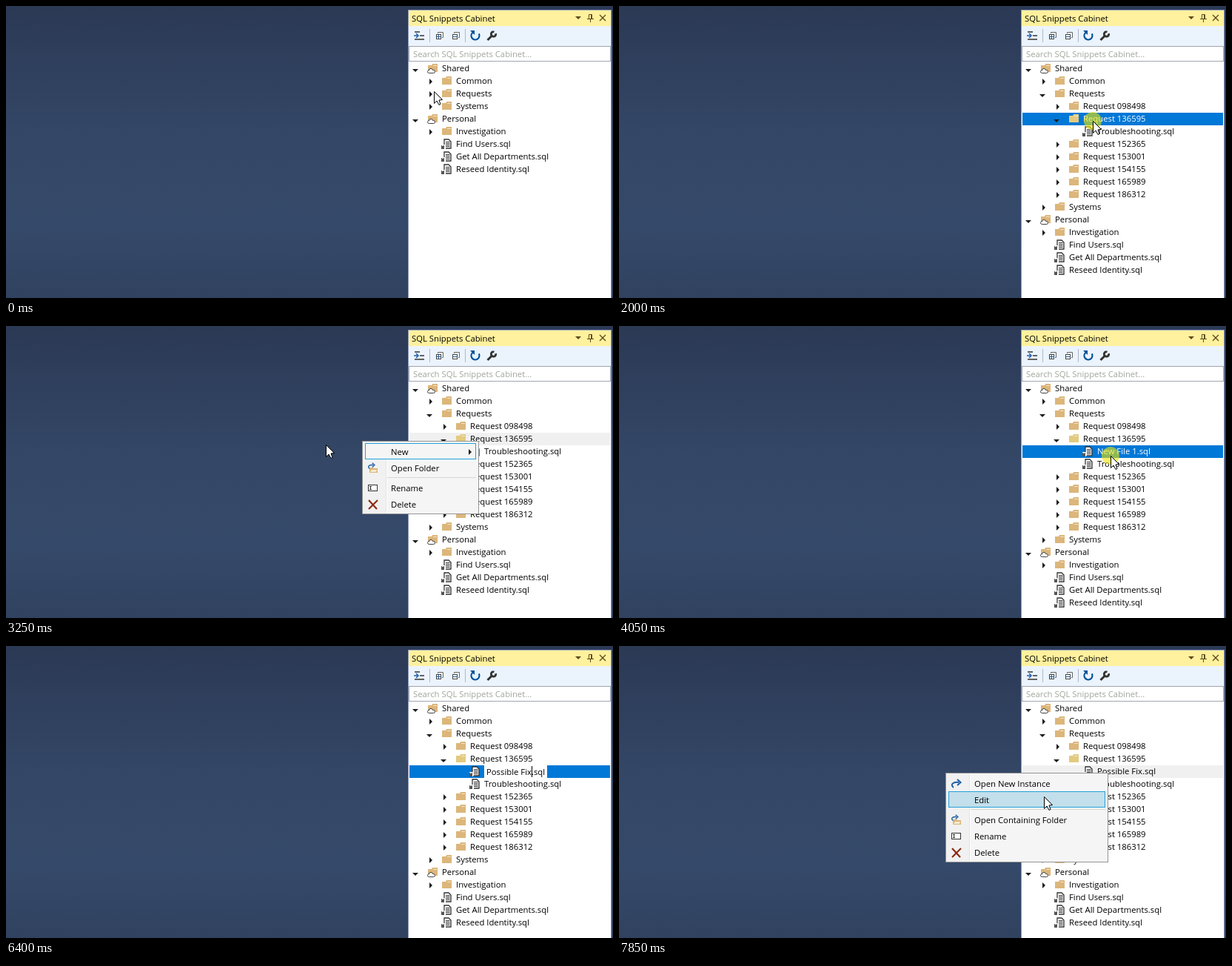
Animation, 820 px wide and 394 px high, one loop 8 s. Source, as an HTML page with a canvas:

```html
<!DOCTYPE html>
<html lang="en">
<head>
<meta charset="utf-8">
<title>Script tree</title>
<style>
html, body { margin: 0; width: 100%; height: 100%; overflow: hidden; background: #30415f; }
canvas { display: block; width: 820px; height: 394px; }
</style>
</head>
<body>
<canvas id="stage" width="820" height="394"></canvas>
<script>
const g = document.getElementById('stage').getContext('2d', { alpha: false });
const LOOP = 8000, STEP = 50;
const NAME = 'SQL Snippets Cabinet';
const FONT = '11.3px "Open Sans", "Noto Sans", sans-serif';
const BLUE = '#0078d7', INK = '#1e1e1e', TAN = '#dcb67a';

// Drawing helpers
function box(x, y, w, h, fill) { g.fillStyle = fill; g.fillRect(x, y, w, h); }
function frame(x, y, w, h, color) {
  g.strokeStyle = color; g.lineWidth = 1;
  g.strokeRect(x + .5, y + .5, w - 1, h - 1);
}
function text(s, x, mid, color = '#000') {
  g.fillStyle = color; g.fillText(s, x, mid + 4);
}
function trace(pts, close) {
  g.beginPath();
  for (let i = 0; i < pts.length; i += 2) g.lineTo(pts[i], pts[i + 1]);
  if (close) g.closePath();
}
function poly(color, ...pts) { trace(pts, true); g.fillStyle = color; g.fill(); }
function line(color, width, ...pts) {
  trace(pts); g.strokeStyle = color; g.lineWidth = width; g.stroke();
}
function at(x, y, draw) { g.save(); g.translate(x, y); draw(); g.restore(); }
const within = (t, a, b) => t >= a && t < b;

// Tree icons, centred on the origin
function folder(color = TAN) {
  poly(color, -6, -4, -1, -4, 0, -6, 7, -6, 7, 5, -6, 5);
  line('rgba(255,255,255,.6)', 1, 1, -3.5, 6, -3.5);
}
function cloudFolder() {
  folder();
  g.beginPath();
  g.arc(-4.5, 4.5, 2, Math.PI / 2, Math.PI * 1.4);
  g.arc(-2, 3, 2.6, Math.PI, Math.PI * 1.95);
  g.arc(1.5, 4.5, 2, -Math.PI / 2, Math.PI / 2);
  g.closePath();
  g.fillStyle = '#fff'; g.strokeStyle = '#424242'; g.lineWidth = 1;
  g.fill(); g.stroke();
}
function script() {
  poly('#fff', -3, -6, 3, -6, 6, -3, 6, 6, -3, 6);
  line('#333', 1.3, -3, 2, -3, -6, 3, -6, 6, -3, 6, 6, -1, 6);
  for (let y = -3; y < 5; y += 2) line('#333', 1, -1, y + .5, 4.5, y + .5);
  box(-7, 1, 5, 6, '#fff');
  box(-7, 2, 4, 5, '#555');
  box(-6, 2, 2, 1, '#ddd');
}
function expander(x, y, open) {
  if (open) poly(INK, x - 4, y + 1, x + 4, y + 1, x, y + 5);
  else poly(INK, x, y - 3, x + 4, y + 1, x, y + 5);
}

// Menu icons
function bentArrow() {
  g.beginPath();
  g.moveTo(-4, 5);
  g.bezierCurveTo(-9, 1, -5, -3, 3, -2);
  g.strokeStyle = '#1c5fa8'; g.lineWidth = 2; g.stroke();
  line('#1c5fa8', 2, 1, -6, 5.5, -2, 1, 2);
}
function openFolder() {
  poly(TAN, -5, -1, 0, -1, 1, 0, 6, 0, 6, 6, -5, 6);
  poly('#f7ead0', -2, 2, 5, 2, 4, 5, -4, 5);
  at(-2, -3, () => { g.scale(.7, .7); bentArrow(); });
}
function renameIcon() {
  box(-7, -5, 13, 9, '#fff');
  frame(-7, -5, 13, 9, '#333');
  line('#333', 1, -5, -2.5, -2, -2.5);
  line('#333', 1, -3.5, -3, -3.5, 2);
  line('#333', 1, -5, 1.5, -2, 1.5);
}
function deleteIcon() {
  line('#8b2a12', 2.2, -6, -6, 5, 6);
  line('#8b2a12', 2.2, 6, -6, -6, 6);
}

// Panel chrome
function backdrop() {
  const sky = g.createLinearGradient(0, 0, 0, 394);
  [[0, '#2b3955'], [.45, '#344766'], [.75, '#35496a'], [1, '#30425f']]
    .forEach(([p, c]) => sky.addColorStop(p, c));
  box(0, 0, 820, 394, sky);
}
function plusBox(x, plus) {
  at(x, 40, () => {
    line('#666', 1, -2.5, -3, -2.5, -4.5, 4.5, -4.5, 4.5, 2.5, 3, 2.5);
    box(-5, -2, 7, 7, '#fff');
    frame(-5, -2, 7, 7, '#444');
    line('#1c5fa8', 1, -4, 1.5, 1, 1.5);
    if (plus) line('#1c5fa8', 1, -1.5, -1, -1.5, 4);
  });
}
function panel() {
  box(543, 5, 275, 389, '#8e9bbc');
  box(544, 6, 273, 21, '#fff19d');
  box(544, 27, 273, 27, '#ebf3fc');
  box(544, 54, 273, 340, '#fff');
  text(NAME, 548, 17);
  const brown = '#5c4a1c';
  poly(brown, 769, 14, 777, 14, 773, 18);
  line(brown, 1, 787.5, 17, 787.5, 11.5, 791.5, 11.5, 791.5, 17);
  line(brown, 1.5, 790.8, 12, 790.8, 17);
  line(brown, 1, 785, 17.5, 794, 17.5);
  line(brown, 1, 789.5, 18, 789.5, 22);
  line(brown, 1.3, 802, 12, 810, 20);
  line(brown, 1.3, 810, 12, 802, 20);

  line('#1c5fa8', 1.5, 551, 40, 557, 40);
  line('#1c5fa8', 1.5, 554, 37, 557, 40, 554, 43);
  line('#333', 1.5, 552, 35, 559, 35);
  line('#333', 1.5, 559, 40, 565, 40);
  line('#333', 1.5, 552, 45, 565, 45);
  box(572, 31, 1, 18, '#b0b8c8');
  box(620, 31, 1, 18, '#b0b8c8');
  plusBox(586, true);
  plusBox(608, false);
  g.beginPath();
  g.arc(634, 40, 5.5, -.5, Math.PI * 1.3);
  g.strokeStyle = '#00539c'; g.lineWidth = 2.2; g.stroke();
  poly('#00539c', 627, 33, 633, 33, 633, 39);
  line('#333', 3, 650.5, 46, 657, 39.5);
  g.beginPath();
  g.arc(658.5, 38, 3.2, -.3, Math.PI * 1.6);
  g.lineWidth = 2.8; g.stroke();

  frame(544, 54, 273, 21, '#a0a6b0');
  text('Search ' + NAME + '...', 550, 65, '#a0a79b');
}

// Timeline: each move is start, end, target x, y and optional control point
const MOVES = [
  [450, 1000, 597, 155, 638, 132],
  [1150, 1250, 594, 153],
  [1800, 1950, 640, 155],
  [2250, 2550, 573, 170],
  [2800, 3200, 432, 160],
  [3600, 3900, 664, 175, 560, 212],
  [7050, 7150, 661, 172],
  [7450, 7850, 574, 203]
];
const CLICKS = [[50, 150], [1500, 1550], [2000, 2100], [3200, 3250], [4050, 4150], [7200, 7300]];
const KEYS = [5400, 5550, 5600, 5700, 5750, 5800, 5900, 5950, 6050, 6200, 6300, 6400];
const TYPED = 'Possible Fix';

function pointer(t) {
  let x = 578, y = 115;
  for (const [a, b, tx, ty, cx = (x + tx) / 2, cy = (y + ty) / 2] of MOVES) {
    if (t < a) break;
    const p = Math.min(1, (t - a + STEP) / (b - a + STEP));
    const u = p * p * (3 - 2 * p), v = 1 - u;
    x = v * v * x + 2 * u * v * cx + u * u * tx;
    y = v * v * y + 2 * u * v * cy + u * u * ty;
  }
  return { x: Math.round(x), y: Math.round(y) };
}
function fileStem(t) {
  const n = KEYS.filter(k => t >= k).length;
  return n ? TYPED.slice(0, n) : 'New File 1';
}

// Tree rows: level, label, icon, open state, marker
function treeRows(t) {
  const rows = [[0, 'Shared', cloudFolder, true], [1, 'Common', folder, false]];
  const unfolded = t >= 100;
  rows.push([1, 'Requests', folder, unfolded]);
  if (unfolded) {
    for (const id of ['098498', '136595', '152365', '153001', '154155', '165989', '186312']) {
      const main = id === '136595', open = main && t >= 1550;
      rows.push([2, 'Request ' + id, folder, open, main ? 'request' : '']);
      if (!open) continue;
      if (t >= 3350) rows.push([3, fileStem(t) + '.sql', script, null, 'file']);
      rows.push([3, 'Troubleshooting.sql', script, null]);
    }
  }
  rows.push([1, 'Systems', folder, false], [0, 'Personal', cloudFolder, true],
    [1, 'Investigation', folder, false]);
  for (const s of ['Find Users', 'Get All Departments', 'Reseed Identity'])
    rows.push([1, s + '.sql', script, null]);
  return rows;
}
function rowFill(mark, t) {
  if (mark === 'request') {
    if (within(t, 2000, 2100)) return BLUE;
    if (within(t, 2100, 3350)) return '#f0f0f0';
  }
  if (mark === 'file') {
    if (within(t, 4050, 6750) || within(t, 7200, 7300)) return BLUE;
    if (t >= 7300) return '#f0f0f0';
  }
}
function tree(t) {
  treeRows(t).forEach(([level, label, icon, open, mark], i) => {
    const mid = 84 + 17 * i, x = 589 + 19 * level;
    const fill = rowFill(mark, t);
    if (fill) box(545, mid - 8, 271, 17, fill);
    if (open !== null) expander(x - 36, mid, open);
    at(x - 13, mid, () => mark === 'request' && t >= 2000 ? folder('#e3ca80') : icon());
    if (mark === 'file' && within(t, 4300, 6750)) editor(label, x, mid, t);
    else text(label, x, mid, fill === BLUE ? '#fff' : '#000');
  });
}
function editor(label, x, mid, t) {
  const stem = g.measureText(fileStem(t)).width;
  const w = Math.round(g.measureText(label).width) + 6;
  const chosen = within(t, 5150, 5400);
  box(x, mid - 8, w, 17, '#fff');
  if (chosen) box(x + 3, mid - 7, stem, 15, '#99c9ef');
  text(label, x + 3, mid + 1);
  if (!chosen && !within(t, 4650, 5000))
    box(Math.round(x + 3 + (t < 5400 ? 0 : stem)), mid - 7, 1, 15, '#000');
}

// Menus: null marks a separator
const REQUEST_MENU = [['New'], ['Open Folder', openFolder], null, ['Rename', renameIcon], ['Delete', deleteIcon]];
const NEW_MENU = [['File'], ['Folder']];
const FILE_MENU = [['Open New Instance', bentArrow], ['Edit'], null,
  ['Open Containing Folder', openFolder], ['Rename', renameIcon], ['Delete', deleteIcon]];

function menu(items, x, y, w, h, cur, opened) {
  box(x, y, w, h, '#f5f5f5');
  box(x + 1, y + 1, 31, h - 2, '#f1f1f1');
  box(x + 32, y + 3, 1, h - 6, '#e2e3e3');
  box(x + 33, y + 3, 1, h - 6, '#fff');
  frame(x, y, w, h, '#959595');
  let top = y + 3;
  for (const item of items) {
    if (!item) {
      box(x + 34, top + 2, w - 38, 1, '#d7d7d7');
      top += 5;
      continue;
    }
    const [label, icon] = item, mid = top + 12;
    const hot = cur.x > x + 3 && cur.x < x + w - 4 && cur.y >= top && cur.y < top + 22;
    const lit = opened && label === 'New';
    if (hot || lit) {
      box(x + 4, top, w - 8, 22, hot ? '#c2dfeb' : '#f5f5f5');
      frame(x + 4, top, w - 8, 22, '#26a0da');
    }
    if (icon) at(x + 15, mid, icon);
    text(label, x + 39, mid);
    if (label === 'New') poly(INK, x + w - 14, mid - 4, x + w - 10, mid, x + w - 14, mid + 4);
    top += 22;
  }
}
function menus(t, cur) {
  if (within(t, 2100, 3300)) menu(REQUEST_MENU, 481, 155, 158, 99, cur, t >= 2550);
  if (within(t, 2550, 3250)) menu(NEW_MENU, 359, 155, 123, 50, cur);
  if (t >= 7300) menu(FILE_MENU, 441, 171, 220, 121, cur);
}

function cursor(t, { x, y }) {
  if (CLICKS.some(([a, b]) => within(t, a, b))) {
    g.beginPath();
    g.arc(x, y, 12, 0, Math.PI * 2);
    g.fillStyle = 'rgba(240,228,0,.6)';
    g.fill();
  }
  if (within(t, 5400, 6750)) return;
  if (within(t, 4300, 5400)) {
    line('#000', 1, x - 3, y - 8.5, x + 4, y - 8.5);
    line('#000', 1, x + .5, y - 8, x + .5, y + 8);
    line('#000', 1, x - 3, y + 8.5, x + 4, y + 8.5);
    return;
  }
  at(x + .5, y + .5, () => {
    poly('#fff', 0, 0, 0, 16, 3.5, 12.5, 6.5, 18, 8.5, 17, 6.5, 11.5, 11, 11);
    g.strokeStyle = '#000'; g.lineWidth = 1; g.stroke();
  });
}

function render(now) {
  const t = Math.floor((now % LOOP) / STEP) * STEP;
  const cur = pointer(t);
  g.font = FONT;
  backdrop();
  panel();
  tree(t);
  menus(t, cur);
  cursor(t, cur);
}
const start = performance.now();
function tick() {
  render(performance.now() - start);
  requestAnimationFrame(tick);
}
tick();
</script>
</body>
</html>
```
